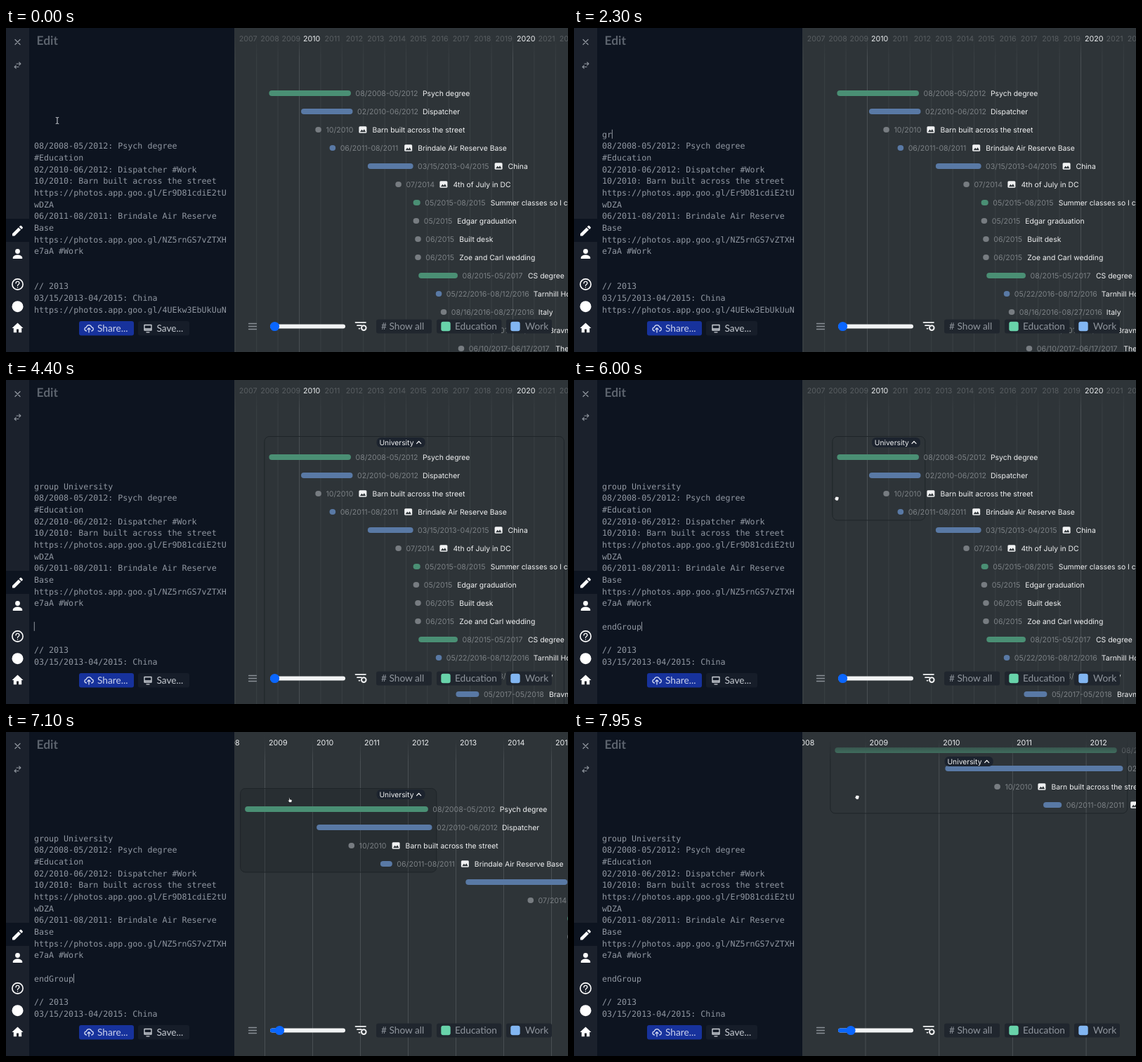
An HTML page that plays this animation: 800 by 462 pixels, repeating every 8 s.

```html
<!DOCTYPE html>
<html lang="en">
<head>
<meta charset="utf-8">
<title>Timeline editor</title>
<style>
  html, body { margin: 0; width: 100%; height: 100%; overflow: hidden; background: #2e3438; }
  svg { display: block; width: 800px; height: 462px; }
  text { white-space: pre; text-rendering: geometricPrecision; }
  .mono { font: 11.67px "DejaVu Sans Mono", monospace; fill: #9097a1; }
  .date { font: 10.6px Inter, sans-serif; fill: #7c8185; }
  .label { font: 10.4px Inter, sans-serif; fill: #f1f2f3; }
  .year { font: 10.7px Inter, sans-serif; fill: #eceef0; }
  .ui { font: 13.7px Lato, sans-serif; fill: #8f959d; }
  .line { fill: none; stroke-width: 1.3; stroke-linecap: round; stroke-linejoin: round; }
</style>
</head>
<body>
<svg viewBox="0 0 800 462">
  <defs>
    <linearGradient id="fade" x1="0" y1="0" x2="0" y2="1">
      <stop offset="0" stop-color="#2e3438"/>
      <stop offset=".28" stop-color="#2e3438" stop-opacity=".95"/>
      <stop offset="1" stop-color="#2e3438" stop-opacity="0"/>
    </linearGradient>
    <clipPath id="pane"><rect x="325" width="475" height="462"/></clipPath>
  </defs>
  <rect width="800" height="462" fill="#2e3438"/>

  <g clip-path="url(#pane)">
    <g id="grid"></g>
    <rect id="box" y="80.5" rx="7" stroke="#1f2529" stroke-width="1"/>
    <g id="rows"></g>
    <rect x="325" width="475" height="42" fill="url(#fade)"/>
    <g id="years"></g>
    <g id="pill">
      <rect y="-7" height="14" rx="6" fill="#1c232e"/>
      <text class="label" x="3.8" y="3.7" style="font-size:10.3px"></text>
      <path class="line" stroke="#f1f2f3" d="M-3 1.6 0 -1.5 3 1.6"/>
    </g>
  </g>

  <g id="toolbar">
    <path class="line" stroke="#8a9096" d="M345.5 421.5h11M345.5 425.5h11M345.5 429.5h11"/>
    <rect x="376" y="422.5" width="107" height="6" rx="3" fill="#f2f3f4"/>
    <rect id="fill" x="376" y="422.5" height="6" rx="3" fill="#0a66ff"/>
    <circle id="thumb" cy="425.5" r="6.6" fill="#0a66ff"/>
    <path class="line" stroke="#f1f2f3" style="stroke-width:1.7" d="M497.5 419.8h14.5M500 424.2h6M502.5 428.6h1"/>
    <circle cx="509.3" cy="427.6" r="3.3" fill="none" stroke="#f1f2f3" stroke-width="2"/>
  </g>

  <rect x="33" width="292" height="462" fill="#0d1420"/>
  <rect width="33" height="462" fill="#1b212c"/>
  <rect y="272" width="34" height="33" fill="#0d1420"/>
  <text class="ui" x="43.5" y="24" style="font-size:17.4px;font-weight:700;fill:#5c636d">Edit</text>
  <path class="line" stroke="#8f959d" d="M13 16.5l7 7M20 16.5l-7 7"/>
  <path class="line" stroke="#8f959d" style="stroke-width:1.1" d="M15 51h5.500M18.700 48.800l2.200 2.200-2.200 2.200M18 55.500h-5.500M14.300 53.300l-2.200 2.200 2.200 2.200"/>
  <path fill="#fff" d="M9 293.3l8.800-8.800 3.300 3.300-8.800 8.800H9zM18.700 283.6l1.500-1.500q.8-.7 1.600 0l1.800 1.800q.7.800 0 1.600l-1.500 1.500z"/>
  <circle cx="16.5" cy="318.5" r="3.4" fill="#fff"/>
  <path fill="#fff" d="M9.800 329v-1.500c0-2.500 4-4 6.700-4s6.700 1.500 6.700 4v1.500z"/>
  <circle cx="16.500" cy="365.500" r="7.600" fill="none" stroke="#fff" stroke-width="1.600"/>
  <path class="line" stroke="#fff" d="M14 364c0-3.500 5-3.500 5-.3 0 1.800-2.500 1.900-2.500 3.800M16.500 369.800v.2"/>
  <circle cx="16.500" cy="397.200" r="8" fill="#fff"/>
  <path fill="#fff" d="M8.500 428l8-7.500 8 7.500h-2.300v6.200h-4.200v-4.700h-3v4.700h-4.200v-6.200z"/>
  <g id="editor"></g>
  <rect id="caret" width="1" height="13" fill="#8f959d"/>

  <rect x="104" y="418" width="78" height="20.5" rx="3" fill="#17329c"/>
  <path class="line" stroke="#d3daf2" d="M114.500 432c-3.500-.5-3.300-4.800-.2-5.200 1-4.300 6.500-4.300 7.500-.2 3.300.4 3.300 5 0 5.400M118 434v-6M116 429.800l2-2 2 2"/>
  <text class="ui" x="130" y="433" style="fill:#ccd3ec">Share...</text>
  <rect x="188" y="418" width="73" height="20.5" rx="3" fill="#161d29"/>
  <path class="line" stroke="#d0d4da" d="M197 423.500h10v7.500h-10zM197 429h10M200 433.800h4"/>
  <text class="ui" x="214.500" y="433" style="fill:#c5cad1">Save...</text>

  <g id="mouse">
    <path class="line" stroke="#c3c7cc" style="stroke-width:1.1" d="M-1.800-4.500q1.800 0 1.800 1.500v6q0 1.500-1.800 1.500M1.800-4.500q-1.800 0-1.800 1.500M1.800 4.500q-1.800 0-1.800-1.500"/>
    <path fill="#f1f2f3" stroke="#14181c" stroke-width=".9" d="M-2.600-1.800q.3-1.800 1.600-1.200 1-.9 1.900 0 1.400-.5 1.900.7 1 .2.700 1.600-.1 2.800-1.600 4.300h-3.300q-1-1.700-2.300-3.100-.6-1.200 1.100-.9z"/>
    <path fill="#f1f2f3" stroke="#14181c" stroke-width=".9" d="M-1.700.6v-3.900q.9-1.300 1.700 0v2.200q2.600-.4 3.600 1.100.2 2.400-1 4h-3.200q-1.400-1.800-2.800-3.400-.2-1.200 1.700 0z"/>
  </g>
</svg>

<script>
const $ = id => document.getElementById(id);
const add = (parent, markup) => {
  parent.insertAdjacentHTML('beforeend', markup);
  return parent.lastElementChild;
};
const set = (el, attrs) => { for (const k in attrs) el.setAttribute(k, attrs[k]); };
const show = (el, on) => { el.style.display = on ? '' : 'none'; };

// Piecewise linear value from [position, value] pairs
function track(x, keys) {
  if (x <= keys[0][0]) return keys[0][1];
  for (let i = 1; i < keys.length; i++) {
    const [a, u] = keys[i - 1], [b, v] = keys[i];
    if (x < b) return u + (v - u) * (x - a) / (b - a);
  }
  return keys[keys.length - 1][1];
}

const LOOP = 8000, STEP = 50;
const GREEN = '#4a8f74', BLUE = '#5979a5', GRAY = '#777c81';

// from, to, colour, date, label, label offset, has picture
const events = [
  [2008.583, 2012.417, GREEN, '08/2008-05/2012', 'Psych degree', 95.5],
  [2010.083, 2012.5, BLUE, '02/2010-06/2012', 'Dispatcher', 93],
  [2010.75, 2010.833, GRAY, '10/2010', 'Barn built across the street', 66, 1],
  [2011.417, 2011.667, BLUE, '06/2011-08/2011', 'Brindale Air Reserve Base', 110.5, 1],
  [2013.203, 2015.333, BLUE, '03/15/2013-04/2015', 'China', 128.5, 1],
  [2014.5, 2014.583, GRAY, '07/2014', '4th of July in DC', 67, 1],
  [2015.333, 2015.667, GREEN, '05/2015-08/2015', 'Summer classes so I can', 93.5],
  [2015.333, 2015.417, GRAY, '05/2015', 'Edgar graduation', 47.5],
  [2015.417, 2015.5, GRAY, '06/2015', 'Built desk', 48],
  [2015.417, 2015.5, GRAY, '06/2015', 'Zoe and Carl wedding', 48],
  [2015.583, 2017.417, GREEN, '08/2015-05/2017', 'CS degree', 93.5],
  [2016.39, 2016.615, BLUE, '05/22/2016-08/12/2016', 'Tarnhill House', 124],
  [2016.62, 2016.65, GRAY, '08/16/2016-08/27/2016', 'Italy', 124],
  [2017.333, 2018.417, BLUE, '05/2017-05/2018', 'Bravnoll', 93],
  [2017.44, 2017.46, GRAY, '06/10/2017-06/17/2017', 'The lake', 123.5]
];

const picture = x => `<g transform="translate(${x} -4.8)">
  <rect width="11" height="9.6" rx="1.5" fill="#f1f2f3"/>
  <path fill="#2e3438" d="M1.5 8 4 4.5l1.7 2L7.5 4l2.2 4z"/></g>`;

const rows = events.map(([, , color, date, label, offset, pic]) => add($('rows'),
  `<g><rect y="-4.1" height="8.2" rx="4.1" fill="${color}"/>
   <text class="date" x="6.5" y="3.8">${date}</text>
   ${pic ? picture(offset - 12.5) : ''}
   <text class="label" x="${offset + 6.5}" y="3.8">${label}</text></g>`));

const years = Array.from({ length: 16 }, (_, i) => 2007 + i).map(year => ({
  year,
  line: add($('grid'), '<path d="M0 0V462" stroke="#c4cace"/>'),
  text: add($('years'), `<text class="year" y="18.8">${year}</text>`)
}));

// Legend chips: x, width, swatch colour, caption, caption offset
[[527, 79, '', '# Show all', 7], [613, 92.5, '#68d3aa', 'Education', 26], [712, 65, '#82b6f2', 'Work', 27]]
  .forEach(([x, w, color, caption, dx]) => add($('toolbar'),
    `<g><rect x="${x}" y="415.5" width="${w}" height="20" rx="3" fill="#20262e"/>
     ${color && `<rect x="${x + 6.3}" y="418.8" width="13.4" height="13.4" rx="3" fill="${color}"/>`}
     <text class="ui" x="${x + dx}" y="430.3">${caption}</text></g>`));

const before = [
  '08/2008-05/2012: Psych degree', '#Education', '02/2010-06/2012: Dispatcher #Work',
  '10/2010: Barn built across the street', 'https://photos.app.goo.gl/Er9D81cdiE2tU', 'wDZA',
  '06/2011-08/2011: Brindale Air Reserve', 'Base',
  'https://photos.app.goo.gl/NZ5rnGS7vZTXH', 'e7aA #Work', ''
];
const after = ['', '// 2013', '03/15/2013-04/2015: China', 'https://photos.app.goo.gl/4UEkw3EbUkUuN'];
const lineY = i => 151.3 + i * 16.667;
const lines = Array.from({ length: 16 }, (_, i) =>
  add($('editor'), `<text class="mono" x="40" y="${lineY(i) + 4.3}"></text>`));

const ENTER = 4400;
const keysA = [2200, 2300, 2400, 2500, 2600, 2750, 2900, 3000, 3050, 3200, 3300, 3400, 3500, 3600, 3750, 3850];
const keysB = [4550, 4700, 4850, 5000, 5150, 5300, 5450, 5600];
const typed = (text, keys, t) => text.slice(0, keys.filter(k => k <= t).length);
const hidden = [[0, 300], [550, 1050], [1550, 2050], [6450, 6950], [7450, LOOP]];

function drawEditor(t, first, second) {
  const text = [first, ...before, ...(t < ENTER ? [] : [second]), ...after];
  lines.forEach((el, i) => {
    if (el.textContent !== (text[i] || '')) el.textContent = text[i] || '';
  });
  const row = t < 4200 ? 0 : t < ENTER ? 11 : 12;
  const col = row ? second.length : first.length;
  set($('caret'), { x: 39.8 + col * 7.025, y: lineY(row) - 6.5 });
  show($('caret'), !hidden.some(([a, b]) => t >= a && t < b));
}

function drawTimeline(t, first, second) {
  const scale = Math.exp(track(t, [[6500, Math.log(30.4)], [7100, Math.log(68)], [7300, Math.log(104.7)]]));
  const pan = track(t, [[7450, 0], [7950, 1]]);
  const ease = pan * pan * (3 - 2 * pan);
  const dy = -84 * ease;
  const origin = track(scale, [[30.4, 417.5], [68, 436.5], [104.7, 467.7]]) + 52 * ease;
  const xOf = year => origin + (year - 2010) * scale;
  const zoom = track(scale, [[30.4, 0], [66, 1]]);

  for (const { year, line, text } of years) {
    const x = xOf(year), major = year % 10 === 0;
    set(line, { transform: `translate(${x} 0)`, opacity: major ? 0.18 : 0.08 + 0.1 * zoom });
    set(text, { x: x + 5.5, opacity: major ? 1 : 0.22 + 0.78 * zoom });
  }

  const grouped = first.startsWith('group');
  const closed = second === 'endGroup';
  const top = (grouped ? 110 : 93) + dy;
  rows.forEach((row, i) => {
    const [from, to] = events[i];
    const w = Math.max((to - from) * scale, 8.6);
    set(row, { transform: `translate(${xOf(from) + w} ${top + 26 * i})` });
    set(row.firstElementChild, { x: -w, width: w });
  });

  const left = xOf(2008.583) - 6.5;
  const right = xOf(closed ? 2012.5 : 2022.19) + 6.3;
  const hover = t >= 6400 && t < 7500;
  show($('box'), grouped);
  show($('pill'), grouped);
  set($('box'), {
    x: left, y: 80.5 + dy, width: right - left, height: closed ? 119.5 : 440,
    fill: hover ? 'rgba(20,25,30,.22)' : 'none'
  });
  if (grouped) {
    const [back, title, chevron] = $('pill').children;
    title.textContent = first.slice(6);
    const w = (title.textContent ? title.getComputedTextLength() : 0) + 20;
    const x = Math.min(568 - w * 0.585, right - 6.8 - w);
    set($('pill'), { transform: `translate(${x} ${Math.max(89 + dy, 42)})` });
    set(back, { width: w });
    set(chevron, { transform: `translate(${w - 9} 0)` });
  }

  const knob = track(scale, [[30.4, 382.5], [68, 389.5], [104.7, 394]]);
  set($('thumb'), { cx: knob });
  set($('fill'), { width: knob - 376 });
}

const mouseX = [[0, 73], [350, 141], [3850, 141], [4200, 110], [5650, 110], [6000, 374], [6250, 408], [6450, 404], [7450, 404], [7950, 403]];
const mouseY = [[0, 132], [350, 151.5], [3850, 151.5], [4200, 340], [5650, 340], [6000, 169], [6250, 82], [6450, 97], [7450, 97], [7950, 93]];

function drawMouse(t) {
  const x = track(t, mouseX), y = track(t, mouseY);
  const shape = x < 325 ? 0 : t >= 6400 && t < 7500 ? 2 : 1;
  set($('mouse'), { transform: `translate(${x} ${y}) scale(${shape ? 0.9 : 1})` });
  show($('mouse'), t < 2200 || (t >= 3900 && t < ENTER) || t >= 5700);
  [...$('mouse').children].forEach((el, i) => show(el, i === shape));
}

const start = performance.now();
function draw() {
  const t = Math.floor((performance.now() - start) % LOOP / STEP) * STEP;
  const first = typed('group University', keysA, t);
  const second = typed('endGroup', keysB, t);
  drawEditor(t, first, second);
  drawTimeline(t, first, second);
  drawMouse(t);
  requestAnimationFrame(draw);
}
draw();
</script>
</body>
</html>
```
